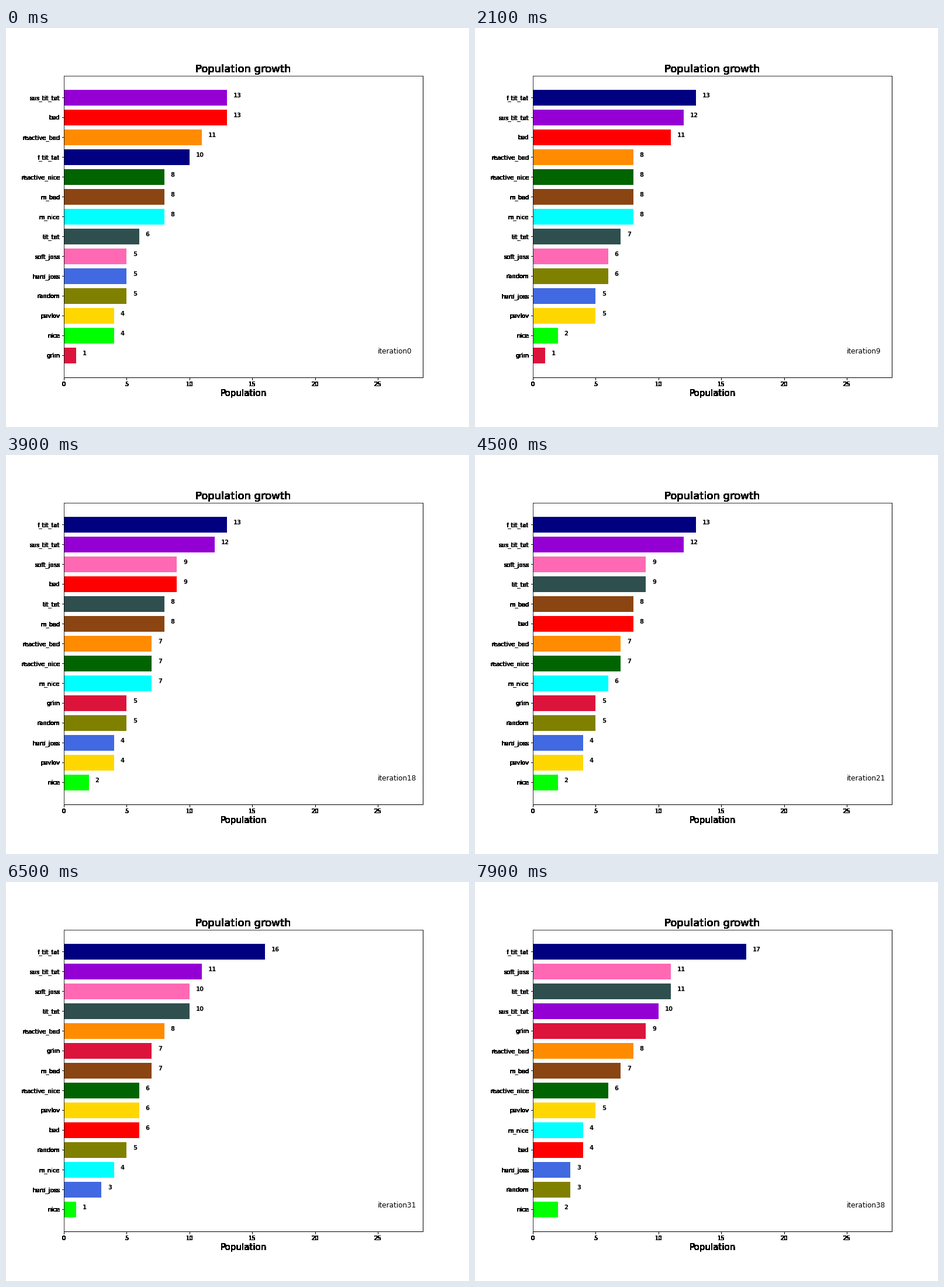
A matplotlib script for the animation above (8 s loop, 792 px wide and 684 px high).

```python
import numpy as np
import matplotlib.pyplot as plt
from matplotlib.animation import FuncAnimation

STEP_MS = 100
FRAMES = 80
HOLD = 5          # ticks before the first iteration
PER_ITER = 2      # ticks per iteration
LAST = (FRAMES - 1 - HOLD) // PER_ITER + 1
TOTAL = 100       # whole population

# Each strategy drifts through evenly spaced points; earlier ones win ties.
STRATEGIES = {
    "grim": ("crimson", 1, 1.4, 5, 6.6, 8.8),
    "reactive_bad": ("darkorange", 11, 7.3, 7, 8.3),
    "reactive_nice": ("darkgreen", 8, 6),
    "soft_joss": ("hotpink", 5.4, 6.3, 9, 10, 11),
    "hard_joss": ("royalblue", 5.2, 2.5),
    "pavlov": ("gold", 4, 5.2, 3.32, 5.55, 5.4),
    "random": ("olive", 5, 5.6, 5, 5.2, 3),
    "tit_tat": ("darkslategray", 6, 5.2, 8.4, 8.4, 9.4, 10, 11),
    "m_bad": ("saddlebrown", 8.4, 7),
    "m_nice": ("cyan", 8, 8, 4.8, 3.6),
    "sus_tit_tat": ("darkviolet", 12.6, 12.1, 10),
    "bad": ("red", 13.49, 4.3),
    "nice": ("lime", 4, 2, 2, 1.2, 2),
    "f_tit_tat": ("navy", 10, 13, 13, 15, 17),
}
NAMES = list(STRATEGIES)
N = len(NAMES)


def drift(it, points):
    knots = np.linspace(0, LAST, len(points))
    return int(np.interp(it, knots, points) + 0.5)


def hard_edges(img, dpi):
    """Turn every touched pixel solid black."""
    out = np.zeros_like(img)
    out[..., 3] = img[..., 3] > 0
    return out, 0, 0


plt.rcParams["figure.subplot.bottom"] = 0.125
fig, ax = plt.subplots(figsize=(11, 9.5), dpi=72)
ax.set_xlim(0, TOTAL / 3.5)
ax.set_ylim(-1.09, N + 0.09)
title = ax.set_title("Population growth", fontsize=18)
ax.set_xlabel("Population", fontsize=15)
ax.set_yticks(range(N))

for art in (title, ax.xaxis, ax.yaxis, ax.spines["bottom"], ax.spines["right"]):
    art.set_agg_filter(hard_edges)

bars = ax.barh(range(N), np.ones(N), linewidth=0)
counts = [ax.text(0, y, "", weight="bold", size=10) for y in range(N)]
caption = ax.text(25, 0.1, "", size=12)


def update(frame):
    it = 0 if frame < HOLD else (frame - HOLD) // PER_ITER + 1
    pop = {name: drift(it, points) for name, (_, *points) in STRATEGIES.items()}
    ranking = sorted(NAMES, key=lambda name: -pop[name])[::-1]
    for bar, count, name in zip(bars, counts, ranking):
        bar.set_width(pop[name])
        bar.set_facecolor(STRATEGIES[name][0])
        count.set_x(pop[name] + 0.5)
        count.set_text(str(pop[name]))
    ax.set_yticklabels(ranking)
    caption.set_text(f"iteration{it}")
    return [*bars, *counts, caption]


anim = FuncAnimation(fig, update, frames=FRAMES, interval=STEP_MS,
                     repeat=True, repeat_delay=0, blit=False)
plt.show()
```
